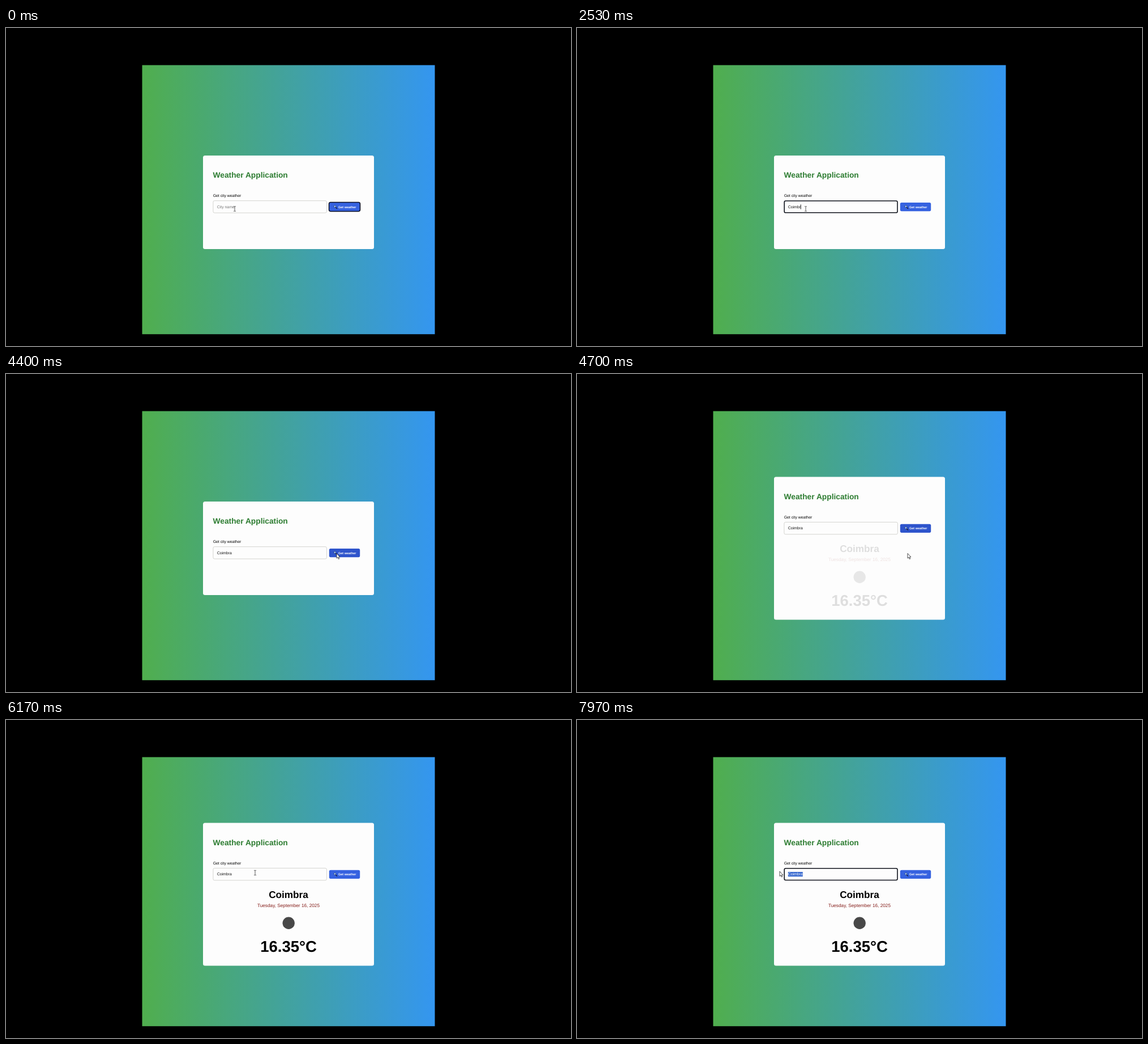
Recreate the animation shown at these times as an HTML page. Size 998 by 561 pixels, loop 8000 ms.

```html
<!DOCTYPE html>
<html lang="en">
<head>
<meta charset="utf-8">
<title>Weather Application</title>
<style>
  html, body { margin: 0; width: 100%; height: 100%; overflow: hidden; background: #000; }
  svg { display: block; width: 100vw; height: 100vh; }
  text { font-family: "Liberation Sans", Arial, sans-serif; font-size: 6.875px; text-rendering: geometricPrecision; }
  .bold { font-weight: bold; }
  .mid { text-anchor: middle; }
</style>
</head>
<body>
<svg viewBox="0 0 998 561">
  <defs>
    <linearGradient id="sky">
      <stop offset="0" stop-color="#50ae4e"/>
      <stop offset="1" stop-color="#3496f0"/>
    </linearGradient>
    <clipPath id="selClip"><rect id="selArea" y="311" height="9"/></clipPath>
  </defs>
  <rect width="998" height="561"/>
  <rect x="240.5" y="65.5" width="517" height="474.7" fill="url(#sky)"/>
  <rect id="card" x="348" width="302" rx="3.5" fill="#fdfdfd"/>

  <g id="form">
    <text class="bold" x="365.6" y="264" fill="#2e7d32" style="font-size:13.75px">Weather Application</text>
    <text x="365.7" y="298.4">Get city weather</text>
    <rect id="field" fill="#fdfdfd"/>
    <text id="value" x="372.8" y="317.7"></text>
    <rect id="sel" y="311.3" height="8.2" fill="#3567cf"/>
    <text x="372.8" y="317.7" fill="#fff" clip-path="url(#selClip)">Coimbra</text>
    <rect id="caret" y="311.4" width=".9" height="8.2"/>
    <rect id="button" x="570.8" y="308" width="54.4" height="15.2" rx="2.6"/>
    <rect id="ring" x="570.5" y="307.6" width="55" height="15.8" rx="2.8" fill="none" stroke="#0c1024" stroke-width="1.5"/>
    <path d="M582.3 316.3l2.2 2.2" stroke="#1c2440" stroke-width="1.5" stroke-linecap="round"/>
    <circle cx="580.9" cy="314.7" r="1.8" fill="#a9cdf2" stroke="#27396f" stroke-width=".7"/>
    <text class="bold" x="587" y="317.7" fill="#fff" style="font-size:5.5px">Get weather</text>
  </g>

  <g id="result" class="mid">
    <text class="bold" x="499" y="314.1" style="font-size:17.2px">Coimbra</text>
    <text x="499" y="330.2" fill="#841c18" style="font-size:8.25px">Tuesday, September 16, 2025</text>
    <circle cx="499.2" cy="358.3" r="10.7" fill="#484848"/>
    <text class="bold" x="499" y="409" style="font-size:27.5px">16.35°C</text>
  </g>

  <path id="beam" d="M-2 -4.2h1.4l.6 .5l.6 -.5h1.4M0 -3.7v7.4M-2 4.2h1.4l.6 -.5l.6 .5h1.4" fill="none" stroke="#333" stroke-width=".8"/>
  <path id="arrow" d="M0 0v8.6l2 -1.8l1.4 3.2l1.4 -.6l-1.4 -3h2.5z" fill="#fff" stroke="#222" stroke-width=".8"/>
</svg>
<script>
const LOOP = 8000, CITY = "Coimbra", LEFT = 372.8, SIZE = 6.875;
const FOCUS = 1230, BLUR = 4250, SHOWN = 4620, GRAB = 7000;
const keyTimes = [1670, 1970, 2110, 2250, 2380, 2500, 2640];
const advances = [.722, .556, .222, .833, .556, .333, .556];
// time, x, y of the pointer
const path = [
  [0, 404, 319], [3480, 404, 319], [3770, 566, 305.5], [3980, 584, 316.5],
  [5600, 584, 316.5], [6170, 440, 269.5], [6500, 402, 271],
  [7150, 402, 271], [7700, 358, 267], [LOOP, 358, 267]
];

const $ = id => document.getElementById(id);
const set = (id, attrs) => { for (const k in attrs) $(id).setAttribute(k, attrs[k]); };
const show = (id, on) => set(id, { visibility: on ? "visible" : "hidden" });
const clamp = v => Math.max(0, Math.min(1, v));
const charX = n => LEFT + SIZE * advances.slice(0, n).reduce((a, b) => a + b, 0);

function pointer(t) {
  const i = path.findIndex(p => p[0] > t), a = path[i - 1], b = path[i];
  const u = (t - a[0]) / (b[0] - a[0]), e = u * u * (3 - 2 * u);
  return [a[1] + (b[1] - a[1]) * e, a[2] + (b[2] - a[2]) * e];
}

function draw(t) {
  const open = t >= SHOWN, focused = t >= FOCUS && t < BLUR || t >= GRAB;
  const typed = keyTimes.filter(k => k <= t).length;
  const [x, y] = pointer(t);

  set("card", open ? { y: 181.5, height: 252 } : { y: 225, height: 165 });
  set("form", { transform: `translate(0 ${open ? -43.3 : 0})` });
  set("result", { opacity: clamp((t - SHOWN) / 700) });

  set("field", focused
    ? { x: 366.2, y: 305, width: 199.8, height: 20.8, rx: 2.4, stroke: "#10131c", "stroke-width": 1.6 }
    : { x: 365.9, y: 304.7, width: 200.5, height: 21.4, rx: 2.4, stroke: "#cbcbc6", "stroke-width": .8 });
  $("value").textContent = typed ? CITY.slice(0, typed) : "City name";
  set("value", { fill: typed ? "#111" : "#757575" });

  // dragging leftwards selects whole letters
  let start = CITY.length;
  if (t > 7150) while (start && x < (charX(start) + charX(start - 1)) / 2) start--;
  const area = { x: charX(start), width: charX(CITY.length) - charX(start) };
  set("sel", area);
  set("selArea", area);

  const lastInput = t >= GRAB ? GRAB : Math.max(FOCUS, ...keyTimes.filter(k => k <= t));
  show("caret", focused && start === CITY.length && (t - lastInput) % 1000 < 500);
  set("caret", { x: charX(typed) - .2 });

  const hover = clamp((t - 3900) / 150) * clamp((4950 - t) / 250);
  set("button", { fill: `rgb(${54 - 8 * hover},${98 - 14 * hover},${224 - 20 * hover})` });
  show("ring", t < FOCUS);

  const inField = x > 365 && x < 567;
  show("beam", inField);
  show("arrow", !inField);
  const transform = `translate(${x} ${y})`;
  set("beam", { transform });
  set("arrow", { transform });
}

const begin = performance.now();
function tick() {
  draw((performance.now() - begin) % LOOP);
  requestAnimationFrame(tick);
}
tick();
</script>
</body>
</html>
```
